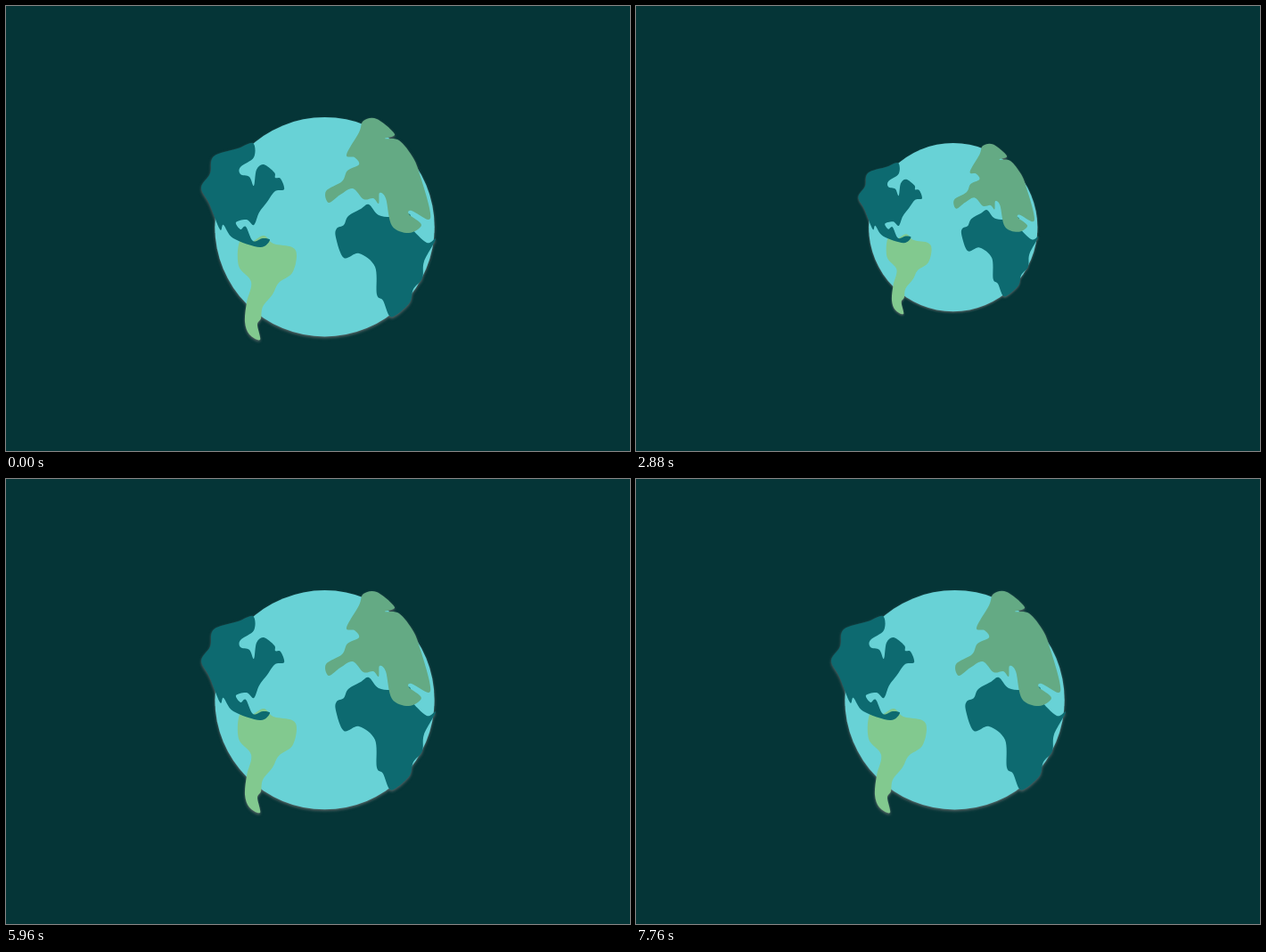
An HTML page for the animation above (8 s loop, 700 px wide and 500 px high).

```html
<!DOCTYPE html>
<html lang="en">
<head>
<meta charset="utf-8">
<title>Turning globe</title>
<style>
  html, body { margin: 0; width: 100%; height: 100%; overflow: hidden; background: #053537; }
  svg { display: block; width: 100%; height: 100%; }
</style>
</head>
<body>
<svg viewBox="0 0 700 500">
  <defs>
    <filter id="shade" x="-10%" y="-10%" width="120%" height="120%" color-interpolation-filters="sRGB">
      <feDropShadow dx="0" dy="1.5" stdDeviation="1.5" flood-color="#777" flood-opacity=".75"/>
    </filter>
  </defs>
  <rect width="700" height="500" fill="#053537"/>
  <g id="globe">
    <g id="map" filter="url(#shade)">
      <circle cx="357.5" cy="248.2" r="123.2" fill="#68d2d6"/>
    </g>
  </g>
</svg>
<script>
const LOOP = 8000, SPAN = 1800;
const globe = document.getElementById('globe');
const map = document.getElementById('map');

// Closed Catmull-Rom curve through "x,y x,y ..." key points.
function smooth(text) {
  const p = text.trim().split(/\s+/).map(s => s.split(',').map(Number));
  const n = p.length, at = i => p[(i + n) % n];
  const handle = (a, b, c, sign) => [0, 1].map(k => (a[k] + sign * (c[k] - b[k]) / 6).toFixed(2));
  let d = 'M' + p[0];
  for (let i = 0; i < n; i++) {
    const a = at(i), b = at(i + 1);
    d += 'C' + [handle(a, at(i - 1), b, 1), handle(b, a, at(i + 2), -1), b].join(' ');
  }
  return d + 'Z';
}

function land(fill, points) {
  const el = document.createElementNS('http://www.w3.org/2000/svg', 'path');
  el.setAttribute('d', smooth(points));
  el.setAttribute('fill', fill);
  map.appendChild(el);
}

// South America
land('#82c98f', `262,265 274,266 289,258 300,267 321,271 326,281 321,300 306,311 299,324
  288,338 286,351 282,358 285,375 273,369 268,355 270,333 275,310 261,292`);

// North America
land('#0d6a70', `277,154 278,170 263,181 263,189 273,192 278,202 281,184 289,178 301,187
  302,193 308,194 312,206 302,208 293,220 284,232 278,246 270,240 258,243 263,251 269,248
  277,264 288,261 296,263 285,271 255,261 244,246 240,251 228,222 219,204 229,188 233,169
  260,160`);

// Africa
land('#0d6a70', `370,260 371,250 379,246 384,236 398,228 407,223 418,235 436,237 453,234
  454,248 472,266 482,262 469,287 467,306 457,318 453,333 438,347 430,348 423,331 416,324
  414,293 396,278 379,283`);

// Europe and Asia
land('#64aa84', `401,129 416,127 436,144 425,149 441,151 457,171 465,192 475,227 474,240
  455,230 452,234 466,246 452,255 433,247 426,216 419,210 418,222 412,216 401,217 389,205
  375,212 362,221 359,208 377,197 383,185 396,178 391,170 382,167 396,142`);

// cubic-bezier(.25, .1, .25, 1)
function ease(x) {
  if (x <= 0) return 0;
  if (x >= 1) return 1;
  let lo = 0, hi = 1;
  for (let i = 0; i < 24; i++) {
    const s = (lo + hi) / 2;
    if (.75 * s * (1 - s) + s ** 3 < x) lo = s; else hi = s;
  }
  const s = lo, r = 1 - s;
  return .3 * s * r * r + 3 * s * s * r + s ** 3;
}

// One turn clockwise, shrink to half, grow back, one turn the other way.
function draw(t) {
  const step = start => ease((t - start) / SPAN);
  const angle = 360 * (step(940) - step(5980));
  const scale = 1 - .5 * (step(2385) - step(4247));
  globe.setAttribute('transform',
    `translate(350 250) rotate(${angle.toFixed(3)}) scale(${scale.toFixed(5)}) translate(-350 -250)`);
}

const begin = performance.now();
function tick() {
  draw((performance.now() - begin) % LOOP);
  requestAnimationFrame(tick);
}
tick();
</script>
</body>
</html>
```
